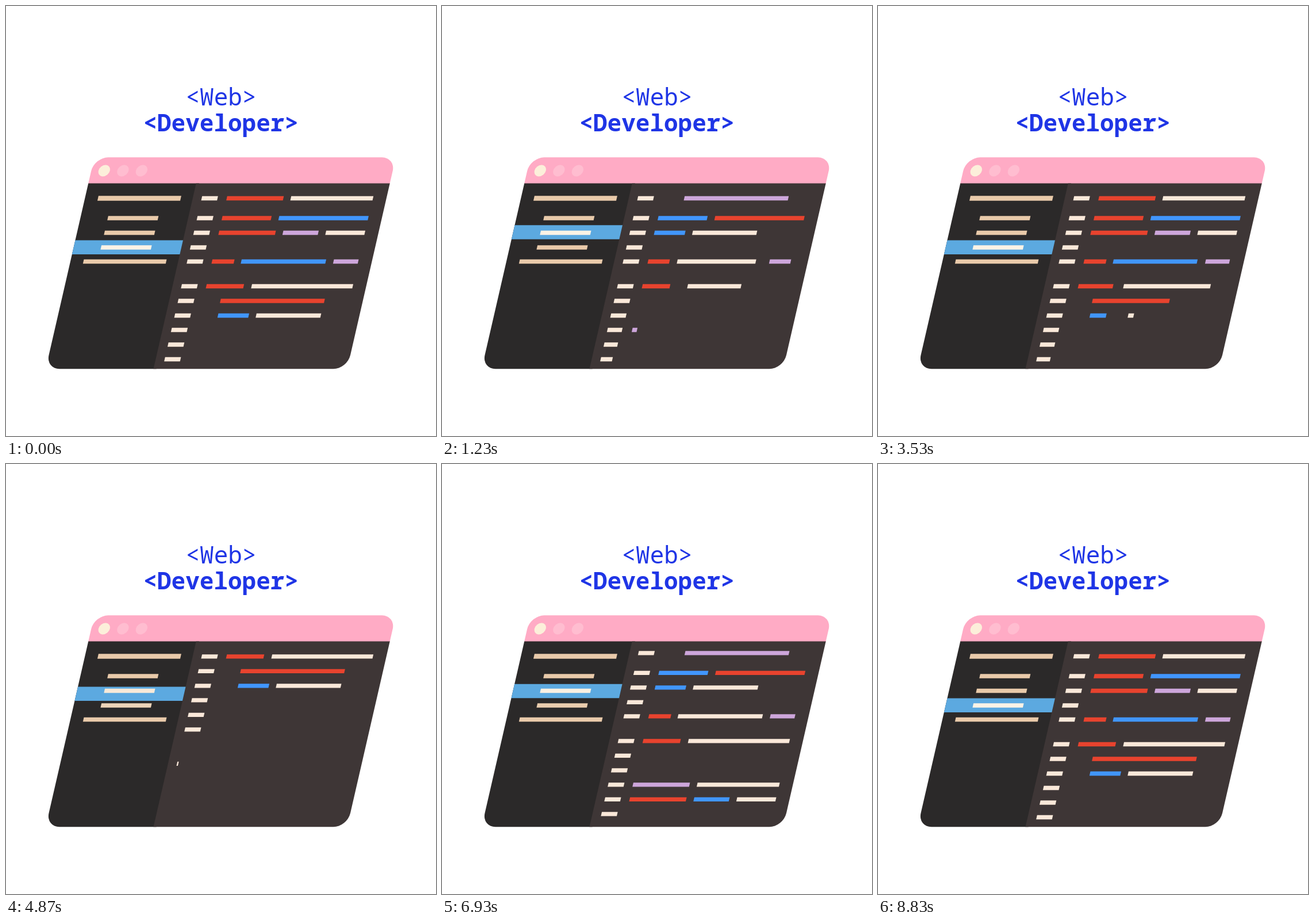
Recreate the animation shown at these times as an HTML page. Size 748 by 748 pixels, loop 8860 ms.

```html
<!DOCTYPE html>
<html lang="en">
<head>
<meta charset="utf-8">
<title>Web Developer</title>
<style>
  html, body { margin: 0; width: 100%; height: 100%; overflow: hidden; background: #fff; }
  svg { display: block; width: 100vw; height: 100vh; }
  text { font: 400 41px "Noto Sans Mono", "DejaVu Sans Mono", monospace; fill: #1f35e6; text-anchor: middle; }
  .bold { font-weight: 700; }
</style>
</head>
<body>
<svg viewBox="0 0 748 748">
  <defs>
    <clipPath id="window"><rect x="137.3" y="263.3" width="524.5" height="368" rx="24"/></clipPath>
    <clipPath id="editor"><rect x="324.8" y="308.5" width="340" height="324"/></clipPath>
  </defs>
  <text x="374" y="173">&lt;Web&gt;</text>
  <text x="373.7" y="218" class="bold">&lt;Developer&gt;</text>
  <g transform="matrix(1 0 -.23 1 76.9 0)">
    <g clip-path="url(#window)">
      <rect x="130" y="260" width="540" height="50" fill="#ffabc5"/>
      <circle cx="159.8" cy="286.5" r="9.9" fill="#fcefda"/>
      <circle cx="192.4" cy="286.5" r="9.9" fill="#ffbdd0"/>
      <circle cx="224.9" cy="286.5" r="9.9" fill="#ffbdd0"/>
      <rect x="130" y="308.5" width="200" height="330" fill="#2b2929"/>
      <rect x="324.8" y="308.5" width="340" height="330" fill="#3e3636"/>
      <rect id="highlight" x="130" width="194.8" height="24.5" fill="#5ca9e0"/>
      <g id="sidebar"></g>
      <g id="pages" clip-path="url(#editor)"></g>
    </g>
  </g>
</svg>
<script>
const LOOP = 8860;
const CYCLE = 133;          // frames at 30 fps, played twice per loop
const PAGE_HEIGHT = 339.5;
const SCROLL_B = 7, SCROLL_A = 74, TYPE_DELAY = 5;
const ROW_Y = [334.5, 369, 394.5, 420, 444.5, 487.5, 513, 538.5, 563.5, 589, 614.5];
const CREAM = '#fae8d9', RED = '#e8432e', BLUE = '#4196fd', PURPLE = '#cda6db';
const PEACH = [233, 202, 170], ACTIVE = [253, 243, 230];

// Each segment: row, colour, x, width, typing start within the page
const codeA = [
  [0, RED, 384, 98.5, 0], [0, CREAM, 495.4, 143, 2],
  [1, RED, 383.8, 85.5, 4], [1, BLUE, 482.5, 155.5, 6],
  [2, RED, 384, 98.5, 8], [2, PURPLE, 495.5, 61.5, 10], [2, CREAM, 570, 68, 12],
  [4, RED, 383.6, 38.5, 12], [4, BLUE, 434.5, 147, 14], [4, PURPLE, 595, 43, 16],
  [5, RED, 383.6, 65, 18], [5, CREAM, 462.4, 176, 20],
  [6, RED, 414, 181, 22],
  [7, BLUE, 415.6, 53.5, 24], [7, CREAM, 482, 112.5, 26]
];
const codeB = [
  [0, PURPLE, 421.4, 181, 4],
  [1, BLUE, 383.8, 85.5, 6], [1, RED, 482.5, 155.5, 8],
  [2, BLUE, 383.2, 53.5, 10], [2, CREAM, 449.6, 112.5, 12],
  [4, RED, 383.6, 38.5, 14], [4, CREAM, 434.5, 147, 16], [4, PURPLE, 595, 43, 18],
  [5, RED, 383.6, 65, 20], [5, CREAM, 462.4, 176, 22],
  [8, PURPLE, 383.5, 98.5, 24], [8, CREAM, 495.2, 143, 26],
  [9, RED, 383.6, 98.5, 28], [9, BLUE, 495.4, 61.5, 30], [9, CREAM, 570, 68, 32]
];
const lineNumbers = ROW_Y.map((y, row) => [row, CREAM, 340.4, 27.6, 2 * row]);

const byId = id => document.getElementById(id);

function add(parent, tag, attrs = {}) {
  const node = document.createElementNS('http://www.w3.org/2000/svg', tag);
  for (const name in attrs) node.setAttribute(name, attrs[name]);
  return parent.appendChild(node);
}

function addBar(parent, y, x, width, height, fill = 'none') {
  return add(parent, 'rect', { x, y: y - height / 2, width, height, fill });
}

function buildPage(code) {
  const group = add(byId('pages'), 'g');
  const bars = [...lineNumbers, ...code].map(([row, color, x, width, start]) =>
    ({ node: addBar(group, ROW_Y[row], x, width, 7.3, color), width, start }));
  return { group, bars };
}

// Ease with horizontal handles: cubic-bezier(x1, 0, x2, 1)
function ease(x, x1, x2) {
  if (x <= 0) return 0;
  if (x >= 1) return 1;
  let low = 0, high = 1, s;
  for (let i = 0; i < 30; i++) {
    s = (low + high) / 2;
    const at = 3 * x1 * s * (1 - s) ** 2 + 3 * x2 * s * s * (1 - s) + s ** 3;
    if (at < x) low = s; else high = s;
  }
  return s * s * (3 - 2 * s);
}

const typeEase = age => ease(age / 15, .167, 0);
const scrollEase = age => ease(age / 30, .16, .1);
const selectEase = age => ease(age / 17, .167, 0);

const sidebar = [0, 1, 2, 3, 4].map(row => {
  const wide = row === 0 || row === 4;
  return addBar(byId('sidebar'), ROW_Y[row], wide ? 160 : 185, wide ? 144 : 87.5, row ? 7.3 : 8.3);
});
const pageA = buildPage(codeA);
const pageB = buildPage(codeB);

function drawPage({ group, bars }, offset, typingAge) {
  group.setAttribute('transform', `translate(0 ${offset})`);
  for (const { node, width, start } of bars) {
    node.setAttribute('width', width * typeEase(typingAge - start));
  }
}

function drawSidebar(up) {
  byId('highlight').setAttribute('y', 407.4 - 26.2 * up);
  sidebar.forEach((bar, row) => {
    const amount = row === 2 ? up : row === 3 ? 1 - up : 0;
    const rgb = PEACH.map((c, i) => Math.round(c + (ACTIVE[i] - c) * amount));
    bar.setAttribute('fill', `rgb(${rgb})`);
  });
}

function render(time) {
  const frame = Math.floor((time % LOOP) * .03 + .15) % CYCLE;
  const toB = scrollEase(frame - SCROLL_B);
  const toA = scrollEase(frame - SCROLL_A);
  const leavingA = frame < SCROLL_A;
  drawPage(pageA, PAGE_HEIGHT * (leavingA ? -toB : 1 - toA),
    leavingA ? CYCLE : frame - SCROLL_A - TYPE_DELAY);
  drawPage(pageB, PAGE_HEIGHT * (1 - toB - toA), frame - SCROLL_B - TYPE_DELAY);
  drawSidebar(selectEase(frame - SCROLL_B) - selectEase(frame - SCROLL_A));
}

const begin = performance.now();
function tick() {
  render(performance.now() - begin);
  requestAnimationFrame(tick);
}
tick();
</script>
</body>
</html>
```
